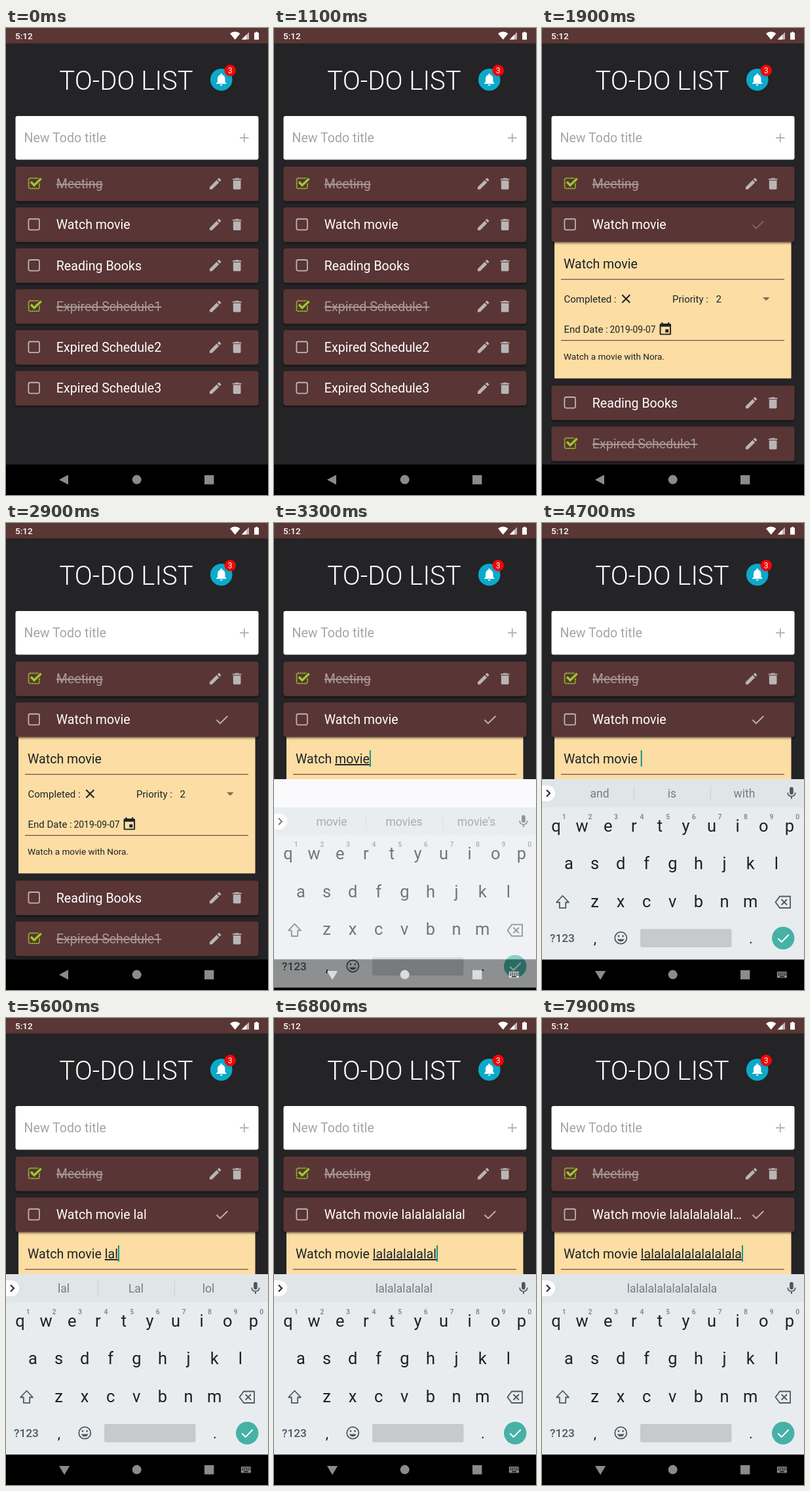
An HTML page that plays this animation: 400 by 711 pixels, repeating every 8000 ms.

```html
<!DOCTYPE html>
<html lang="en">
<head>
<meta charset="utf-8">
<title>To-do list</title>
<style>
  html, body { margin: 0; width: 100%; height: 100%; overflow: hidden; background: #242326; }
  svg { display: block; width: 100%; height: 100%; font-family: Roboto, sans-serif; }
  text { white-space: pre; }
  .mid { text-anchor: middle; }
  .under { text-decoration: underline; }
  .line { fill: none; stroke-width: 1.8; }
</style>
</head>
<body>
<svg id="stage" viewBox="0 0 400 711"></svg>
<script>
const LOOP = 8000;
const ROW = '#5a3634', ICON = '#b9b5b5', INK = '#1d2226', KEY = '#4d585e';
const PITCH = 62.25, PANEL_H = 209;
const SIZE = 19.6;

const text = (x, y, size, fill, str, extra = '') =>
  `<text x="${x}" y="${y}" font-size="${size}" fill="${fill}" ${extra}>${str}</text>`;
const rect = (x, y, w, h, fill, extra = '') =>
  `<rect x="${x}" y="${y}" width="${w}" height="${h}" fill="${fill}" ${extra}/>`;
const path = (d, fill, extra = '') => `<path d="${d}" fill="${fill}" ${extra}/>`;
const stroke = (d, color, width = 1.8, extra = '') =>
  `<path d="${d}" class="line" stroke="${color}" style="stroke-width:${width}" ${extra}/>`;
const icon = (x, y, d, fill, scale = 0.97) =>
  path(d, fill, `transform="translate(${x} ${y}) scale(${scale})"`);

const PENCIL = 'M3 17.25V21h3.75L17.8 9.94l-3.75-3.75zM20.7 7.04a1 1 0 0 0 0-1.41l-2.34-2.34a1 1 0 0 0-1.41 0l-1.83 1.83 3.75 3.75z';
const TRASH = 'M6 19a2 2 0 0 0 2 2h8a2 2 0 0 0 2-2V7H6zM19 4h-3.5l-1-1h-5l-1 1H5v2h14z';
const BELL = 'M12 22a2 2 0 0 0 2-2h-4a2 2 0 0 0 2 2zm6-6v-5c0-3.1-1.6-5.6-4.5-6.3V4a1.5 1.5 0 0 0-3 0v.7C7.6 5.4 6 7.9 6 11v5l-2 2v1h16v-1z';
const CALENDAR = 'M17 12h-5v5h5zM16 1v2H8V1H6v2H5a2 2 0 0 0-2 2v14a2 2 0 0 0 2 2h14a2 2 0 0 0 2-2V5a2 2 0 0 0-2-2h-1V1zm3 18H5V8h14z';
const MIC = 'M12 14a3 3 0 0 0 3-3V5a3 3 0 0 0-6 0v6a3 3 0 0 0 3 3zm5.3-3a5.3 5.3 0 0 1-10.6 0H5a7 7 0 0 0 6 6.7V21h2v-3.3A7 7 0 0 0 19 11z';

const todos = [
  ['Meeting', true], ['Watch movie', false], ['Reading Books', false],
  ['Expired Schedule1', true], ['Expired Schedule2', false], ['Expired Schedule3', false]
];

function checkbox(done) {
  if (!done) return rect(34.4, 17.5, 16.6, 16.6, 'none', `rx="2.5" stroke="${ICON}" stroke-width="1.8"`);
  return rect(34.6, 17.6, 16.4, 15.8, 'none', 'rx="2" stroke="#9cc232" stroke-width="1.8" stroke-dasharray="2.4 .7"') +
    stroke('M38 23.2l5 5.2 10.6-10.2', ROW, 6) + stroke('M38 23.2l5 5.2 10.6-10.2', '#9ccb2b', 3.4);
}

function row([label, done], i) {
  const tools = icon(308, 14.5, PENCIL, ICON) + icon(341, 14.5, TRASH, ICON);
  const edited = i === 1;
  return `<g ${edited ? 'id="editedRow"' : ''} class="row" transform="translate(0 ${211 + i * PITCH})">` +
    rect(14.5, 0, 371, 52.5, ROW, 'rx="4" filter="url(#shadow)"') + checkbox(done) +
    text(76.8, 33.2, SIZE, done ? '#a89b9a' : '#fff', label,
      (done ? 'text-decoration="line-through"' : '') + (edited ? ' id="rowTitle"' : '')) +
    (edited
      ? `<g id="tools">${tools}</g>` + stroke('M321.5 26.5l5.4 5.4 11.4-11.2', ICON, 1.9, 'id="save"')
      : tools) + '</g>';
}

const panel = `<g clip-path="url(#panelClip)">
  ${rect(19, 325, 361.5, PANEL_H - 0.5, '#fcdda4')}
  <text id="field" x="33" y="366" font-size="${SIZE}" fill="${INK}"><tspan id="plain"></tspan><tspan id="composing" class="under"></tspan></text>
  ${rect(0, 346, 2, 25, '#12958c', 'id="caret"')}
  ${rect(29, 382, 341, 1.2, '#744746')}
  ${text(33.5, 418, 15, INK, 'Completed :')}
  ${stroke('M122.3 406.3l12 12m0-12l-12 12', INK, 2)}
  ${text(199, 418, 15, INK, 'Priority :')}
  ${text(265.5, 418, 15, INK, '2')}
  ${path('M337 410h10.5l-5.2 5.2z', '#7c6e57')}
  ${text(33.5, 464, 15, INK, 'End Date :')}
  ${text(103.5, 464, 13.9, INK, '2019-09-07')}
  ${icon(176.7, 447, CALENDAR, INK)}
  ${rect(29, 475, 341, 1.2, '#744746')}
  ${text(33, 504.5, 13.6, INK, 'Watch a movie with Nora.')}
</g>`;

const header = rect(0, 0, 400, 23.5, ROW) +
  text(14, 17, 13.6, '#fff', '5:12', 'font-weight="500"') +
  path('M342 8.5a11.5 11.5 0 0 1 15.4 0l-7.7 9.2z', '#fff') +
  path('M371 6.3v11.2h-11.2z', '#c5b5b4') + path('M367 10.3v7.2h-7.2z', '#fff') +
  path('M379 7h2v-1.3h3V7h2v10.7h-7z', '#fff') +
  text(183.5, 94, 40, '#fff', 'TO-DO LIST', 'class="mid" font-weight="300"') +
  '<circle cx="328.7" cy="78.7" r="16.8" fill="#0ba9ca"/>' +
  icon(317.2, 66.8, BELL, '#fff', 0.96) +
  '<circle cx="342.2" cy="64.6" r="8.8" fill="#f20505"/>' +
  text(342.2, 68.8, 12, '#fff', '3', 'class="mid"') +
  rect(14.5, 134, 371, 66.5, '#fff', 'rx="3"') +
  text(27.5, 174, SIZE, '#a5a5a5', 'New Todo title') +
  stroke('M357 167.3h13.6m-6.8-6.8v13.6', '#b3b3b3', 1.9);

const keyRow = (letters, x, y) => [...letters].map((c, i) =>
  text((x + i * 39.6).toFixed(1), y, 25.5, INK, c, 'class="mid"')).join('');

const keyboard = `<g id="keyboard">
  ${rect(0, 390, 400, 274.5, '#e8ecef')}${rect(0, 390, 400, 42.5, '#e0e5e8')}
  <g id="hints">${[88, 198.5, 309].map(x => text(x, 418, 17.5, '#737d82', '', 'class="mid"')).join('')}</g>
  <g id="dividers">${rect(140, 400, 1, 23, '#c8ced1')}${rect(257, 400, 1, 23, '#c8ced1')}</g>
  ${path('M0 399.5h8a12 12 0 0 1 0 24h-8z', '#fff')}
  ${stroke('M7 406.5l5 5-5 5', INK, 2)}
  ${icon(369.5, 400, MIC, KEY, 0.95)}
  ${keyRow('qwertyuiop', 21.5, 469.5)}
  ${[...'1234567890'].map((c, i) => text((33.8 + i * 39.6).toFixed(1), 450.5, 10.5, '#758086', c, 'class="mid" font-weight="500"')).join('')}
  ${keyRow('asdfghjkl', 41, 527)}${keyRow('zxcvbnm', 80.5, 584.5)}
  ${stroke('M31.5 567.5l9.4 10h-4.7v8.6h-9.4v-8.6h-4.7z', KEY, 1.8, 'stroke-linejoin="round"')}
  ${stroke('M363 568.5h16v17.5h-16l-6.5-8.7zM365.5 573l8.5 8.5m0-8.5l-8.5 8.5', KEY)}
  ${text(31, 638, 17.3, KEY, '?123', 'class="mid" font-weight="500"')}
  ${text(81, 639.5, 22, INK, ',', 'class="mid"')}${text(319, 639.5, 22, INK, '.', 'class="mid"')}
  <circle cx="120.3" cy="631.7" r="9" class="line" stroke="${KEY}"/>
  <circle cx="117" cy="629" r="1.4" fill="${KEY}"/><circle cx="123.6" cy="629" r="1.4" fill="${KEY}"/>
  ${path('M115 633.5h10.6a5.5 5 0 0 1-10.6 0z', KEY)}
  ${rect(150, 618, 139.5, 28, '#c6cacd', 'rx="3"')}
  <circle cx="368.2" cy="632" r="17.2" fill="#46b1a7"/>
  ${stroke('M360.2 632.5l5.5 5.4 11-11.2', '#fff', 2)}
</g>`;

const keyDots = [0, 1].map(r => [0, 1, 2, 3, 4].map(c =>
  rect(360.5 + c * 2.8, 684.5 + r * 2.8, 1.6, 1.6, '#000')).join('')).join('');

const nav = `<g id="nav" fill="#8b8b8b">
  <path id="back" d="M81 687.7l14-7.5v15z"/>
  <path id="hide" d="M81 682h16.2l-8.1 13.6z"/>
  <circle cx="199.7" cy="687.6" r="7"/>
  <rect x="303" y="680.8" width="14.4" height="14"/>
  <g id="switcher"><rect x="358.8" y="683" width="15.2" height="9.4" rx="1"/>${keyDots}${rect(363, 690, 7, 1.3, '#000')}</g>
</g>`;

document.getElementById('stage').innerHTML = `<defs>
  <filter id="shadow" x="-5%" y="-20%" width="110%" height="150%">
    <feDropShadow dx="0" dy="2" stdDeviation="1.6" flood-color="#000" flood-opacity=".5"/></filter>
  <clipPath id="panelClip"><rect id="panelBox" x="0" y="325" width="400" height="0"/></clipPath></defs>
  ${rect(0, 0, 400, 711, '#242326')}${header}${panel}
  ${todos.map(row).join('')}
  ${rect(0, 390, 400, 274.5, '#fafafc', 'id="resized"')}
  ${rect(0, 664.5, 400, 47, '#000')}${keyboard}${nav}`;

const $ = id => document.getElementById(id);
const rows = [...document.querySelectorAll('.row')];
const hints = [...$('hints').children];
const show = (id, on) => $(id).setAttribute('visibility', on ? 'visible' : 'hidden');
const span = (t, from, to) => Math.min(1, Math.max(0, (t - from) / (to - from)));
const smooth = p => p * p * (3 - 2 * p);

const EXPAND = 1450, FOCUS = 3220, SPACE = 4400;
const keyTime = i => i < 3 ? 4850 + i * 300 : 5500 + (i - 2) * 130;
const presses = Array.from({ length: 20 }, (_, i) => keyTime(i));

function suggestions(word, spaced) {
  if (!spaced) return ['movie', 'movies', "movie's"];
  if (!word) return ['and', 'is', 'with'];
  if (word === 'lal') return ['lal', 'Lal', 'lol'];
  if (word.length > 6) return ['', word, ''];
  return [word, 'L' + word.slice(1), word + 'la'];
}

function draw(t) {
  const open = smooth(span(t, EXPAND, 1800));
  const shift = PANEL_H * open;
  $('panelBox').setAttribute('height', shift);
  rows.forEach((el, i) => el.setAttribute('transform',
    `translate(0 ${211 + i * PITCH + (i > 1 ? shift : 0)})`));
  show('tools', t < EXPAND);
  $('save').setAttribute('opacity', t < EXPAND ? 0 : 0.1 + 0.9 * span(t, 1750, 2250));

  const spaced = t >= SPACE, focused = t >= FOCUS;
  const count = presses.filter(p => t >= p).length;
  const word = 'la'.repeat(10).slice(0, count);
  const clipped = count > 14 ? word.slice(0, 13) + '…' : word;
  $('rowTitle').textContent = 'Watch movie' + (spaced ? ' ' : '') + clipped;
  $('plain').textContent = spaced ? 'Watch movie ' : 'Watch ';
  $('composing').textContent = spaced ? word : 'movie';
  $('composing').style.textDecoration = focused ? 'underline' : 'none';

  const lastInput = count ? presses[count - 1] : spaced ? SPACE : FOCUS;
  show('caret', focused && (t - lastInput) % 1000 < 500);
  $('caret').setAttribute('x', 33 + $('field').getComputedTextLength());

  const rise = span(t, 3200, 3450);
  show('resized', t >= 3200);
  $('keyboard').setAttribute('transform', `translate(0 ${72 * (1 - rise)})`);
  $('keyboard').setAttribute('opacity', 1 - (1 - rise) ** 1.8);
  const up = rise > 0;
  show('back', !up);
  show('hide', up);
  show('switcher', up);
  $('nav').setAttribute('fill', up && rise < 1 ? '#dadcdd' : '#8b8b8b');

  const words = suggestions(word, spaced);
  hints.forEach((el, i) => { el.textContent = words[i]; });
  show('dividers', words[0] !== '');
}

const start = performance.now();
function tick() {
  draw((performance.now() - start) % LOOP);
  requestAnimationFrame(tick);
}
tick();
</script>
</body>
</html>
```
